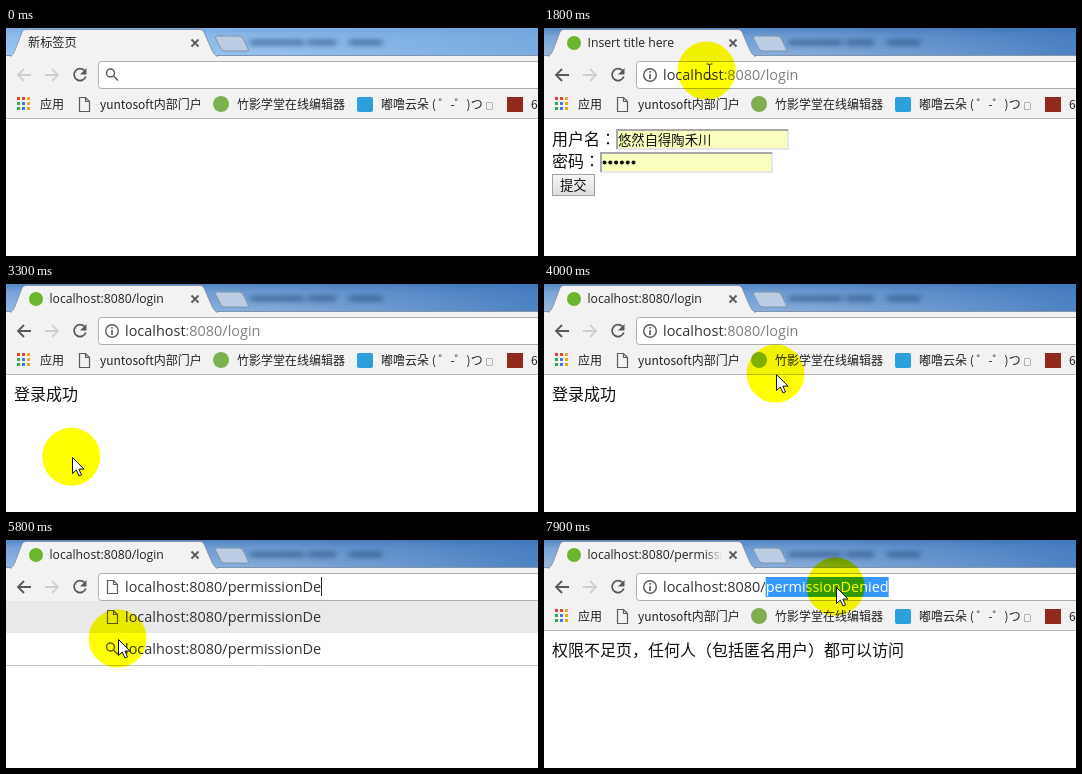
These frames come from a looping animation (532 by 228 pixels, 8 s). An HTML page:

```html
<!DOCTYPE html>
<html lang="zh-CN">
<head>
<meta charset="utf-8">
<title>Login demo</title>
<style>
  html, body { margin: 0; width: 100%; height: 100%; overflow: hidden; background: #fff; }
  svg { display: block; width: 532px; height: 228px; }
  text { font-family: "Open Sans", "Noto Sans", "Noto Sans CJK SC", "Noto Sans CJK", sans-serif; white-space: pre; }
  .cjk text { font-family: "Noto Sans CJK SC", "Noto Sans CJK", sans-serif; }
  .cjk .colon { font-family: "Noto Sans CJK TC", "Noto Sans CJK", sans-serif; }
  .tab { font-size: 12.2px; fill: #222; }
  .url { font-size: 14.45px; fill: #333; }
  .marks text { font-size: 12px; fill: #222; }
  .page text { font-size: 16px; fill: #111; }
  .page .field { font-size: 13.33px; }
  .icon { fill: none; stroke: #5a5a5a; stroke-width: 1.8; }
  .thin { stroke-width: 1.2; }
  #halo { mix-blend-mode: multiply; }
</style>
</head>
<body>
<svg viewBox="0 0 532 228" id="stage">
  <defs>
    <linearGradient id="glass" x2="0" y2="1">
      <stop offset="0" stop-color="#5888c4"/>
      <stop offset=".3" stop-color="#7ba5d8"/>
      <stop offset="1" stop-color="#98bae2"/>
    </linearGradient>
    <linearGradient id="deep">
      <stop offset="0" stop-color="#3672b8" stop-opacity="0"/>
      <stop offset=".5" stop-color="#3672b8" stop-opacity=".2"/>
      <stop offset="1" stop-color="#3672b8" stop-opacity=".75"/>
    </linearGradient>
    <linearGradient id="btn" x2="0" y2="1">
      <stop offset="0" stop-color="#f6f6f6"/>
      <stop offset="1" stop-color="#dcdcdc"/>
    </linearGradient>
    <linearGradient id="fade" gradientUnits="userSpaceOnUse" x1="160" x2="179">
      <stop offset="0" stop-color="#f2f2f2" stop-opacity="0"/>
      <stop offset="1" stop-color="#f2f2f2"/>
    </linearGradient>
    <filter id="blur" x="-20%" y="-100%" width="140%" height="300%"><feGaussianBlur stdDeviation="3 2"/></filter>
    <clipPath id="tabClip"><rect x="20" y="4" width="159" height="22"/></clipPath>
    <clipPath id="selClip"><rect id="selBox" y="37" height="20"/></clipPath>
  </defs>

  <!-- window frame -->
  <rect width="532" height="28" fill="url(#glass)"/>
  <rect width="532" height="28" fill="url(#deep)"/>
  <rect id="shine" width="532" height="28" fill="#a4d6ff" opacity=".5"/>
  <g filter="url(#blur)" fill="#27507f" opacity=".5">
    <rect x="244" y="11" width="54" height="7"/>
    <rect x="302" y="11" width="28" height="7"/>
    <rect x="343" y="11" width="33" height="7"/>
  </g>
  <path d="M211 8H233Q236 8 237.500 11L243 23H219Q216 23 214.500 20L209.500 10Q209 8 211 8Z" fill="#bccde3" stroke="#8094b0"/>
  <rect y="28" width="532" height="63" fill="#f2f2f2"/>
  <path d="M0 27.500H5M211 27.500H532" stroke="#8094b0"/>
  <path d="M4 28.500C8 27 9 22 16 4Q17 1.500 20 1.500H194Q197 1.500 198 4C206 22 207 27 212 28.500" fill="#f2f2f2" stroke="#8596ad"/>
  <g clip-path="url(#tabClip)">
    <circle id="favicon" cx="30" cy="15" r="7" fill="#6cb52d"/>
    <text id="title" class="tab" y="19"></text>
    <rect x="160" y="4" width="20" height="22" fill="url(#fade)"/>
  </g>
  <path d="M185.500 11.500L192.500 18.500M192.500 11.500L185.500 18.500" class="icon"/>

  <!-- toolbar -->
  <path id="back" class="icon" d="M25 47H12.500M18 41L12 47L18 53"/>
  <path class="icon" style="stroke:#cfcfcf" d="M39 47H51.500M46 41L52 47L46 53"/>
  <path class="icon" d="M78.500 42.500A6 6 0 1 0 79.800 48.500"/>
  <path d="M80.500 40V46.500H74Z" fill="#5a5a5a"/>
  <rect x="92.500" y="33.500" width="450" height="27" rx="3" fill="#fff" stroke="#aeaeae"/>
  <g id="lens" class="icon" style="stroke-width:1.500"><circle cx="104.500" cy="45" r="4"/><path d="M107.500 48L112 52.500"/></g>
  <g id="info"><circle class="icon" style="stroke-width:1.400" cx="106" cy="47" r="6.300"/><path d="M106 43V44.700M106 46V51" stroke="#5a5a5a" stroke-width="1.600"/></g>
  <path id="doc" class="icon thin" d="M101.500 40.500H107.500L111.500 44.500V53.500H101.500ZM107.500 40.500V44.500H111.500"/>
  <text id="url" class="url" x="119" y="52"><tspan id="host"></tspan><tspan id="rest"></tspan></text>
  <g clip-path="url(#selClip)">
    <rect x="92" y="37" width="440" height="20" fill="#3399ff"/>
    <text id="urlSel" class="url" x="119" y="52" style="fill:#fff"></text>
  </g>
  <rect id="caret" y="37" width="1" height="19" fill="#222"/>

  <!-- bookmarks -->
  <g class="marks cjk">
    <g id="apps"></g>
    <text x="34" y="81">应用</text>
    <path class="icon thin" d="M73.500 69.500H79.500L83.500 73.500V83.500H73.500ZM79.500 69.500V73.500H83.500"/>
    <text x="94" y="81">yuntosoft内部门户</text>
    <circle cx="215" cy="76" r="8" fill="#7fb04f"/>
    <text x="231" y="81">竹影学堂在线编辑器</text>
    <rect x="351" y="69" width="16" height="15" rx="2" fill="#2ba0dd"/>
    <text x="375" y="81">嘟噜云朵 ( ゜-゜)つ <tspan font-size="8">□</tspan></text>
    <rect x="501" y="69" width="16" height="15" fill="#8f2a1c"/>
    <text x="525" y="81">6</text>
  </g>
  <path d="M0 90.500H532" stroke="#b9b9b9"/>

  <!-- pages -->
  <g id="form" class="page cjk">
    <text x="8" y="117">用户名<tspan class="colon" lang="zh-TW">：</tspan></text>
    <text x="8" y="139">密码<tspan class="colon" lang="zh-TW">：</tspan></text>
    <g id="inputs"></g>
    <text class="field" x="74" y="116.500">悠然自得陶禾川</text>
    <g id="dots"></g>
    <rect id="button" x="8.500" y="146.500" width="42" height="21" fill="url(#btn)"/>
    <text class="field" x="16" y="162">提交</text>
  </g>
  <g class="page cjk"><text id="message" x="8" y="116"></text></g>

  <!-- suggestions -->
  <g id="drop">
    <rect y="61" width="532" height="64" fill="#fff"/>
    <rect y="61" width="532" height="32" fill="#e9e9e9"/>
    <path d="M0 125.500H532" stroke="#c4c4c4"/>
    <path class="icon thin" d="M101.500 70.500H107.500L111.500 74.500V83.500H101.500ZM107.500 70.500V74.500H111.500"/>
    <g class="icon" style="stroke-width:1.500"><circle cx="104.500" cy="107" r="4"/><path d="M107.500 110L112 114.500"/></g>
    <text id="hint1" class="url" x="119" y="82"></text>
    <text id="hint2" class="url" x="119" y="114"></text>
  </g>

  <!-- pointer -->
  <circle id="halo" r="29" fill="#ff0"/>
  <g id="pointer">
    <circle id="ring" cx="-1" cy="1" r="5.500" fill="none" stroke="#d01020" stroke-width="3"/>
    <path id="beam" d="M-1 -7.500H1L2 -6.500L3 -7.500H5M2 -6.500V6.500M-1 7.500H1L2 6.500L3 7.500H5" fill="none" stroke="#222"/>
    <path id="arrow" d="M0 0V16L3.800 12.500L6.500 18.500L9 17.400L6.400 11.600H11.500Z" fill="#fff" stroke="#111"/>
  </g>
</svg>
<script>
const $ = id => document.getElementById(id);
const LOOP = 8000, STEP = 100;
const HOST = 'localhost', BASE = ':8080/';

// time, x, y of the pointer
const path = [
  [1500, 215, 30], [1800, 163, 43], [2000, 163, 43], [2500, 22, 162], [2900, 22, 162],
  [3200, 40, 177], [3800, 194, 154], [4000, 232, 90], [4300, 340, 40], [4600, 270, 47],
  [4700, 262, 47], [5000, 93, 50], [5500, 112, 99], [6200, 112, 99], [6500, 230, 101],
  [6700, 316, 49], [7000, 336, 32], [7400, 351, 62], [7600, 292, 47], [8000, 292, 47]
];

// start, tab title, path after the base address, page
const views = [
  [0, '新标签页', null, ''],
  [1300, 'localhost:8080/login', 'login', ''],
  [1500, 'Insert title here', 'login', 'form'],
  [3000, 'localhost:8080/login', 'login', '登录成功'],
  [6300, 'localhost:8080/permissionDenied', 'permissionDenied', '权限不足页，任何人（包括匿名用户）都可以访问']
];

// start, typing end, address path, page load
const typings = [
  [0, 600, 'userPage', 1300],
  [5100, 5900, 'permissionDenied', 6300]
];

function rect(parent, x, y, w, h, fill) {
  const r = document.createElementNS('http://www.w3.org/2000/svg', 'rect');
  Object.entries({ x, y, width: w, height: h, fill }).forEach(([k, v]) => r.setAttribute(k, v));
  parent.append(r);
  return r;
}

function buildParts() {
  const hues = ['#e4412f', '#e4412f', '#f0a51e', '#35a853', '#3c7de0', '#f0a51e', '#35a853', '#3c7de0', '#f0a51e'];
  hues.forEach((c, i) => rect($('apps'), 11 + i % 3 * 5, 69 + Math.floor(i / 3) * 5, 3, 3, c));
  for (const [x, y] of [[72, 101], [56, 124]]) {
    rect($('inputs'), x, y, 173, 21, '#e6e6e6');
    rect($('inputs'), x, y, 172, 2, '#a8a8a8');
    rect($('inputs'), x, y, 2, 20, '#a8a8a8');
    rect($('inputs'), x + 2, y + 2, 169, 17, '#faffbd');
  }
  for (let i = 0; i < 6; i++) rect($('dots'), 58.5 + i * 5.8, 132.5, 4, 4, '#111').setAttribute('rx', 2);
}

const show = (id, on) => $(id).setAttribute('display', on ? 'inline' : 'none');

function put(id, text) {
  if ($(id).textContent !== text) $(id).textContent = text;
}

function pointerAt(t) {
  const i = path.findIndex(p => p[0] > t);
  const [t0, x0, y0] = path[i - 1], [t1, x1, y1] = path[i];
  const k = (t - t0) / (t1 - t0);
  return [x0 + (x1 - x0) * k, y0 + (y1 - y0) * k];
}

function widthOf(n) {
  return n ? $('urlSel').getSubStringLength(0, n) : 0;
}

function drawAddress(t, view, x) {
  const typing = typings.find(p => t >= p[0] && t < p[3]);
  let text = view[2] === null ? '' : HOST + BASE + view[2];
  if (typing) {
    const full = HOST + BASE + typing[2];
    const k = Math.min(1, (t - typing[0]) / (typing[1] - typing[0]));
    text = full.slice(0, Math.round(full.length * k));
  }
  const dragged = t >= 4700 && t < 5100, word = t >= 7600;
  put('host', text.slice(0, HOST.length));
  put('rest', text.slice(HOST.length));
  put('urlSel', text);
  $('rest').setAttribute('fill', typing || dragged || word ? '#333' : '#7f7f7f');

  const end = 119 + widthOf(text.length);
  let from = end;
  if (dragged) from = Math.min(end, Math.max(119, x));
  if (word) from = 119 + widthOf(HOST.length + BASE.length);
  $('selBox').setAttribute('x', from);
  $('selBox').setAttribute('width', end - from);

  const open = Boolean(typing && text);
  show('drop', open);
  show('doc', open);
  show('lens', !text);
  show('info', text && !open);
  put('hint1', text);
  put('hint2', text);
  $('caret').setAttribute('x', Math.round(end));
  show('caret', open && !(t >= 900 && t < 1300));
}

function drawPointer(t, x, y) {
  const on = t >= path[0][0];
  show('halo', on);
  show('pointer', on);
  $('halo').setAttribute('cx', x - .4);
  $('halo').setAttribute('cy', y - .4);
  $('pointer').setAttribute('transform', `translate(${Math.round(x) + .5} ${Math.round(y) + .5})`);
  const beam = x > 90 && y > 33 && y < 61 && t < 7600;
  show('beam', beam);
  show('arrow', !beam);
  show('ring', t >= 4700 && t < 5100);
  $('button').setAttribute('stroke', x < 51 && y > 146 ? '#707070' : '#a3a3a3');
}

function draw(now) {
  const t = Math.floor(now % LOOP / STEP) * STEP;
  const view = views.filter(v => v[0] <= t).pop();
  const [x, y] = t < path[0][0] ? [0, 0] : pointerAt(t);
  const loaded = view[2] !== null;
  put('title', view[1]);
  $('title').setAttribute('x', loaded ? 43.5 : 22);
  show('favicon', loaded);
  show('shine', t < 600);
  $('back').style.stroke = loaded ? '#5a5a5a' : '#cfcfcf';
  show('form', view[3] === 'form');
  put('message', view[3] === 'form' ? '' : view[3]);
  drawAddress(t, view, x);
  drawPointer(t, x, y);
}

buildParts();
const start = performance.now();
function tick() {
  draw(performance.now() - start);
  requestAnimationFrame(tick);
}
tick();
</script>
</body>
</html>
```
